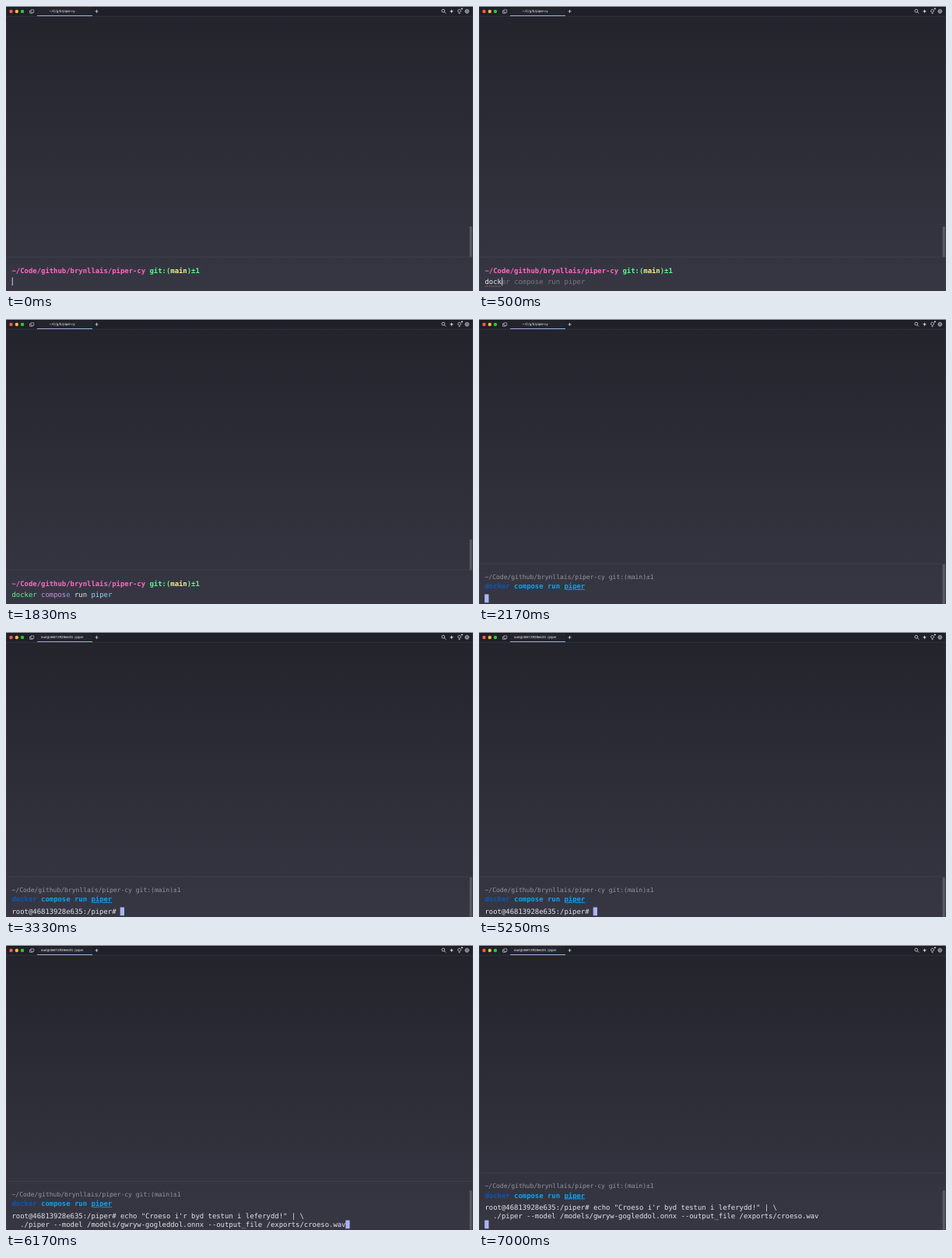
Recreate the animation shown at these times as an HTML page. Size 600 by 366 pixels, loop 8 s.

```html
<!DOCTYPE html>
<html lang="en">
<head>
<meta charset="utf-8">
<title>Terminal session</title>
<style>
html, body { margin: 0; width: 100%; height: 100%; overflow: hidden; background: #2b2b35; }
svg { display: block; width: 100vw; height: 100vh; }
text { font-family: "DejaVu Sans Mono", monospace; font-size: 8.91px; fill: #e4e4ea; white-space: pre; text-rendering: geometricPrecision; }
.b { font-weight: bold; }
.dim { font-size: 8.03px; fill: #96959e; }
.tab { font-family: Roboto, sans-serif; font-size: 4.34px; fill: #f0f0f4; text-anchor: middle; }
.icon { fill: none; stroke: #d6d5de; stroke-width: .8; }
.rule { stroke: #42424e; stroke-width: .8; }
.link { text-decoration: underline; }
</style>
</head>
<body>
<svg viewBox="0 0 600 366" preserveAspectRatio="none">
  <defs>
    <linearGradient id="bg" x2="0" y2="1">
      <stop stop-color="#23232b"/><stop offset="1" stop-color="#373744"/>
    </linearGradient>
    <linearGradient id="line">
      <stop stop-color="#b79ad8"/><stop offset="1" stop-color="#7fbfe4"/>
    </linearGradient>
  </defs>
  <rect width="600" height="366" fill="url(#bg)"/>

  <g id="bar">
    <rect width="600" height="13" fill="#202028"/>
    <rect x="40" width="71" height="13" fill="#24242c"/>
    <path class="rule" d="M0 13.2H600" opacity=".7"/>
    <rect x="40" y="12" width="71" height="1" fill="url(#line)"/>
    <circle cx="6.5" cy="7" r="2.2" fill="#fb5a52"/>
    <circle cx="13.8" cy="7" r="2.2" fill="#f6b92f"/>
    <circle cx="21" cy="7" r="2.2" fill="#2cc640"/>
    <g class="icon">
      <path d="M32 4.9H35.8V8.3H32ZM32 6H30.5V9.3H34.2V8.3" stroke-width=".6"/>
      <path d="M116.5 4.8V9M114.4 6.9H118.6"/>
      <circle cx="561.8" cy="6.2" r="1.9"/><path d="M563.2 7.6L565.2 9.6"/>
      <path d="M572.5 4.4L573.1 6.2L574.8 6.8L573.1 7.4L572.5 9.2L571.9 7.4L570.2 6.8L571.9 6.2Z" fill="#d6d5de" stroke-width=".2"/>
      <path d="M581.7 8.2C580 7 580.3 4.4 582.5 4.4S585 7 583.3 8.2ZM581.6 9.6H583.4"/>
      <circle cx="592.3" cy="6.8" r="2.1"/><circle cx="592.3" cy="6.8" r=".7"/>
      <circle cx="592.3" cy="6.8" r="2.6" stroke-dasharray="1 1.04" stroke-width=".6"/>
    </g>
    <circle cx="585.8" cy="3.4" r="1" fill="#e9e8ef"/>
    <text class="tab" id="title" x="72" y="8.2"></text>
  </g>

  <rect id="scroll" x="595.6" width="3.2" rx="1.2" fill="#5a5964"/>

  <g id="input">
    <path class="rule" d="M0 322.4H600"/>
    <text class="b" x="7.5" y="342.8"><tspan fill="#ff6ac1">~/Code/github/brynllais/piper-cy</tspan><tspan fill="#5af78e"> git:(</tspan><tspan fill="#f3f08a">main</tspan><tspan fill="#5af78e">)±1</tspan></text>
    <text id="typed" x="7.5" y="357"></text>
    <path id="wave" stroke="#a59a82" stroke-width=".7" stroke-dasharray="1.6 1.1"/>
    <rect id="caret" y="348.6" width="1" height="10.4" fill="#c3cbf4"/>
  </g>

  <g id="block">
    <path class="rule" d="M0 314.3H600"/>
    <text class="dim" x="7.5" y="333.6">~/Code/github/brynllais/piper-cy git:(main)±1</text>
    <text class="b" x="7.5" y="346"><tspan fill="#0b58b8">docker</tspan><tspan fill="#0aa5f2"> compose run </tspan><tspan fill="#0aa5f2" class="link">piper</tspan></text>
    <g id="mark" fill="#fff">
      <rect x="147" y="353.4" width="236" height="10.8"/>
      <rect x="7.3" y="364.1" width="429.2" height="10.8"/>
    </g>
    <text id="shell" x="7.5" y="361.8"><tspan>root@46813928e635:/piper# </tspan><tspan id="echo">echo "Croeso i'r byd testun i leferydd!" | \</tspan></text>
    <text id="model" x="7.5" y="372.5">  ./piper --model /models/gwryw-gogleddol.onnx --output_file /exports/croeso.wav</text>
  </g>
  <rect id="cursor" y="353.5" width="5.3" height="10.7" fill="#a9b6f2"/>
  <path d="M.25 366V3Q.25 .25 3 .25H597Q599.75 .25 599.75 3V366" fill="none" stroke="#504f5a" stroke-width=".5"/>
  <rect width="600" height=".8" fill="#c4c4ca"/>
</svg>
<script>
const $ = id => document.getElementById(id);
const LOOP = 8000, LEFT = 7.5, CELL = 5.364, LINE = 10.75;
const ENTER = 1750, RUN = 1920, SHELL = 3250, TITLE = 3330, PASTE = 5420, PLAIN = 5920, EXEC = 6920;
const TICK = 1000 / 12, LEAD = 8; // typing tick; LEAD absorbs rounding of the step times

// characters typed after each tick
const keys = [0, 1, 1, 2, 3, 3, 4, 5, 6, 6, 7, 8, 10, 11, 13, 14, 16, 18, 20, 22, 24];
const words = [
  ["docker", "#5af78e"], [" ", ""], ["compos", "#c792e0"], ["e", "#6aa4ee"],
  [" ", ""], ["run", "#dfe9f2"], [" ", ""], ["piper", "#8fd9f2"]
];
const TEXT = "#ececf1", GHOST = "#777680";
const show = (id, on) => $(id).setAttribute("visibility", on ? "inherit" : "hidden");
const set = (id, attrs) => { for (const k in attrs) $(id).setAttribute(k, attrs[k]); };

function drawInput(t) {
  const count = keys[Math.min(Math.floor(t / TICK), keys.length - 1)];
  let at = 0, html = "";
  const span = (s, color) => { if (s) html += `<tspan fill="${color}">${s}</tspan>`; };
  for (const [word, color] of words) {
    const n = Math.max(0, Math.min(word.length, count - at));
    const known = n === word.length && count > 6;
    if (count) {
      span(word.slice(0, n), known && color || TEXT);
      span(word.slice(n), GHOST);
    }
    at += word.length;
  }
  $("typed").innerHTML = html;
  set("wave", { d: `M${LEFT} 360H${LEFT + count * CELL}` });
  show("wave", count > 0 && count < 7);
  set("caret", { x: LEFT + count * CELL + .2 });
  show("caret", t < ENTER);
}

function drawBlock(t) {
  const ready = t >= SHELL, pasted = t >= PASTE, done = t >= EXEC;
  const marked = pasted && t < PLAIN;
  set("block", { transform: `translate(0 ${-LINE * (pasted + done)})` });
  show("shell", ready);
  show("echo", pasted);
  show("model", pasted);
  show("mark", marked);
  for (const id of ["echo", "model"]) $(id).style.fill = marked ? "#443d4a" : "";
  const col = !ready || done ? 0 : pasted ? 80 : 26;
  set("cursor", { x: LEFT + col * CELL - .3 });
}

function render(t) {
  const running = t >= RUN;
  for (const id of ["block", "cursor"]) show(id, running);
  show("input", !running);
  $("title").textContent = t >= TITLE ? "root@46813928e635: /piper" : "~/C/g/b/piper-cy";
  set("scroll", running ? { y: 315, height: 51 } : { y: 283, height: 40 });
  if (running) drawBlock(t);
  else drawInput(t);
  if (!running) for (const id of ["shell", "echo", "model", "mark"]) show(id, false);
}

const start = performance.now();
function loop() {
  render((performance.now() - start) % LOOP + LEAD);
  requestAnimationFrame(loop);
}
loop();
</script>
</body>
</html>
```
